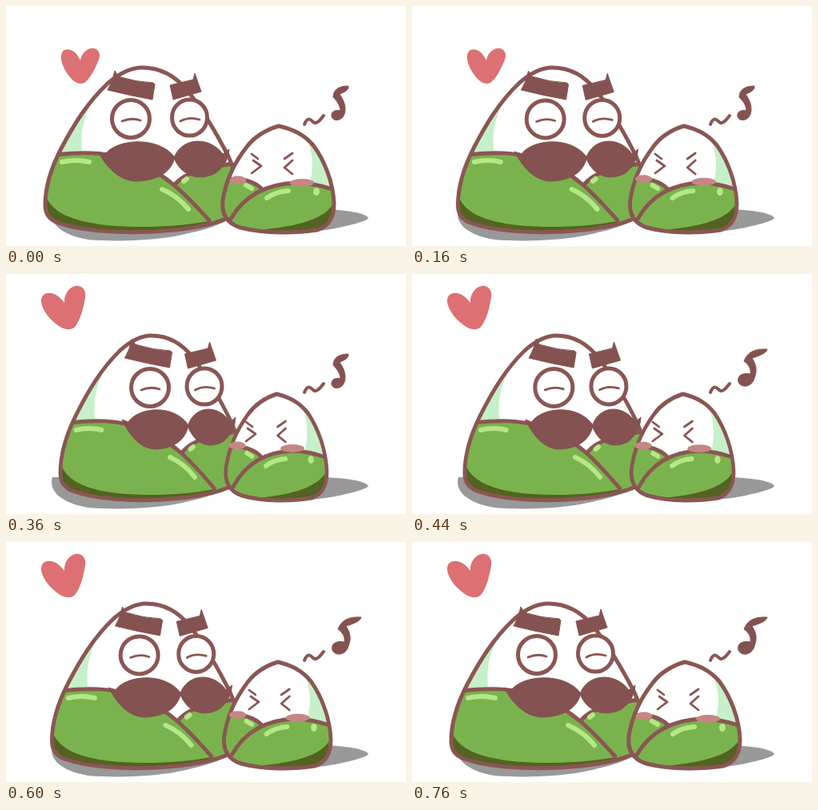
An HTML page for the animation above (800 ms loop, 500 px wide and 300 px high).

```html
<!DOCTYPE html>
<html lang="en">
<head>
<meta charset="utf-8">
<title>Two dumplings</title>
<style>
  html, body { margin: 0; width: 100%; height: 100%; overflow: hidden; background: #fff; }
  svg { display: block; width: 100%; height: 100%; }
  .line { fill: none; stroke: #8a5653; stroke-width: 5; stroke-linecap: round; stroke-linejoin: round; }
  .thin { stroke-width: 2.8; }
  .glass { fill: #fff; }
  .hair { fill: #845250; stroke: #845250; stroke-linejoin: round; }
  .white { fill: #fff; }
  .leaf { fill: #7ab34d; }
  .tint { fill: #c6f0c9; }
  .dark { fill: #536321; }
  .shine { fill: none; stroke: #b5e788; stroke-width: 6; stroke-linecap: round; }
  .blush { fill: #c58783; }
  .shadow { fill: #999; }
</style>
</head>
<body>
<svg viewBox="0 0 500 300">
  <defs>
    <path id="dadBody" d="M170 77C155 77 141 85 128 96C102 120 85 148 69 178C57 201 49 225 49 249C49 260 54 267 65 271C96 282 145 284 185 282C219 280 255 276 279 264C292 245 291 215 278 188C262 157 246 130 227 106C210 85 190 77 170 77Z"/>
    <path id="babyBody" d="M341 150C324 155 311 163 301 176C286 195 275 217 271 243C269 261 277 272 293 277C324 285 363 284 389 280C405 275 410 263 410 247C409 220 398 193 384 174C372 160 358 154 341 150Z"/>
    <clipPath id="dadClip"><use href="#dadBody"/></clipPath>
    <clipPath id="babyClip"><use href="#babyBody"/></clipPath>
  </defs>

  <path class="shadow" d="M58 254C53 270 67 286 103 292C140 295 180 293 210 288C240 282 260 277 276 268L300 279C345 286 395 283 425 275Q451 269 453 265C450 259 428 255 395 254Z"/>

  <g data-move=".061 21.9 0">
    <g clip-path="url(#dadClip)">
      <use href="#dadBody" class="white"/>
      <path class="tint" d="M40 190L110 115C95 143 92 160 96 190Z"/>
      <path class="leaf" d="M211 223C226 206 250 202 290 196V280H240Z"/>
      <path class="line" d="M211 223C226 206 250 202 290 196"/>
      <path class="shine" d="M222 219L226 216"/>
      <path class="leaf" d="M40 188C82 182 116 182 148 190C196 204 226 237 254 268L255 290H40Z"/>
      <path class="dark" d="M48 232C54 258 82 269 125 274C170 278 215 276 254 269V290H40Z"/>
      <path class="line" d="M62 186C97 182 121 183 148 190C196 204 226 237 254 268"/>
      <path class="shine" d="M70 195Q88 191 104 195M195 229Q214 237 228 254"/>
    </g>
    <use href="#dadBody" class="line"/>
  </g>

  <g data-move="0 24 1">
    <circle class="line glass" cx="156" cy="141" r="23.5"/>
    <path class="line thin" d="M145 144Q157 139 168 143"/>
  </g>
  <g data-move="0 18.5 1">
    <ellipse class="line glass" cx="229.5" cy="139.5" rx="22" ry="22.5"/>
    <path class="line thin" d="M218 144Q229 138 242 142"/>
  </g>
  <path class="hair" data-move="0 21.5 0" d="M136 81L140 88Q162 95 184 96L186 98L183 117Q155 112 127 105Q133 95 136 81Z"/>
  <path class="hair" data-move="0 18.5 1" d="M205 99L234 92L236 84L244 107L209 117Z"/>
  <g class="hair" data-move=".134 45.4 0">
    <path d="M115 182L124 185C139 166 190 162 211 189C206 211 184 219 161 219C139 217 125 200 115 182Z"/>
    <path d="M210 190C219 164 254 162 271 185L279 179Q278 197 262 209C240 220 219 212 210 190Z"/>
  </g>

  <g data-move=".092 28.8 0">
    <g clip-path="url(#babyClip)">
      <use href="#babyBody" class="white"/>
      <path class="tint" d="M376 166C385 187 384 207 379 224L415 232V166Z"/>
      <path class="leaf" d="M265 215Q305 213 323 231L284 290H260Z"/>
      <path class="line" d="M275 217Q306 213 322 231"/>
      <path class="shine" stroke-width="4" d="M300 224L307 228"/>
      <path class="leaf" d="M281 266C299 235 329 222 364 221Q387 222 414 230V290H281Z"/>
      <path class="dark" d="M412 242C402 265 370 275 315 280V290H412Z"/>
      <path class="line" d="M281 266C299 235 329 222 364 221Q387 222 408 229"/>
      <path class="shine" d="M326 240Q337 232 353 231"/>
      <ellipse cx="388" cy="232" rx="4" ry="5" fill="#b5e788"/>
    </g>
    <use href="#babyBody" class="line"/>
  </g>
  <ellipse class="blush" data-move="0 -1 -3" cx="290" cy="217.5" rx="10.5" ry="5"/>
  <ellipse class="blush" data-move="0 -12 -3" cx="370" cy="221" rx="15" ry="5"/>
  <path class="line thin" data-move="0 -7 0" d="M307 185L315 191M309 193L319 200L307 209"/>
  <path class="line thin" data-move="0 -8.5 0" d="M358 184L348 191M358 193L348 202L358 210"/>

  <path id="heart" fill="#dc7073" d="M0 0C-5 -11 -13 -16 -20 -13C-28 -8 -23 7 -16 17C-9 27 -2 31 5 28C13 22 19 9 23 -1C27 -12 18 -18 10 -14C4 -11 1 -6 0 0Z"/>
  <path class="line" stroke-width="4" style="stroke-width:4" d="M373 148C377 138 381 142 384 145S391 145 397 137"/>
  <path class="hair note" d="M409 114C409 104 417 100 428 100Q429 106 417 110C422 118 426 126 423 135C420 144 409 145 407 138C406 132 412 129 418 131C418 124 413 118 409 114Z"/>
  <path class="hair note" d="M415 109C419 98 428 93 444 94Q443 100 425 105C430 113 432 120 428 130C425 142 411 143 408 135C406 127 413 123 423 125C424 119 421 113 415 109Z"/>
</svg>
<script>
  const LOOP = 800, STEP = 40;
  const movers = [...document.querySelectorAll('[data-move]')].map(el =>
    ({ el, move: el.dataset.move.split(' ').map(Number) }));
  const heart = document.getElementById('heart');
  const notes = document.querySelectorAll('.note');

  function draw(now) {
    const step = Math.floor(now % LOOP / STEP);
    const squeeze = Math.min(step, 19 - step) / 9;
    for (const { el, move: [shrink, dx, dy] } of movers) {
      el.setAttribute('transform',
        `matrix(${1 - shrink * squeeze} 0 0 1 ${dx * squeeze} ${dy * squeeze})`);
    }
    heart.setAttribute('transform', step < 9
      ? 'translate(93 68)' : 'translate(73 36) rotate(-12) scale(1.17)');
    notes.forEach((note, i) => note.style.display = i === +(step >= 10) ? '' : 'none');
    requestAnimationFrame(draw);
  }
  draw(performance.now());
</script>
</body>
</html>
```
